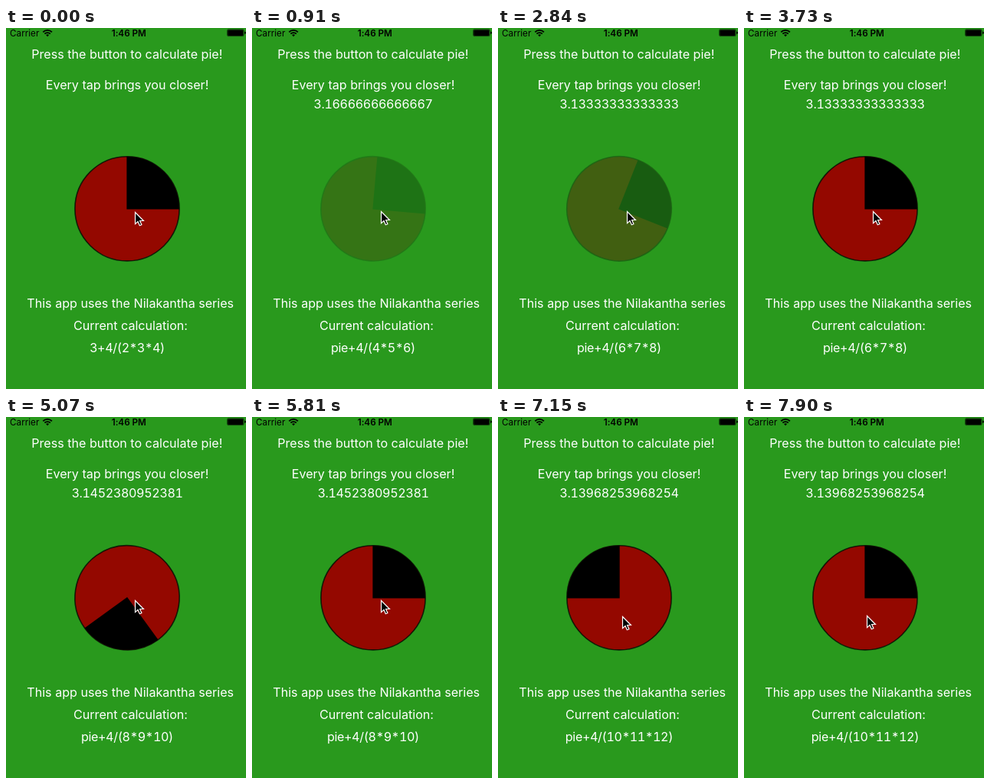
Recreate the animation shown at these times as an HTML page. Size 313 px wide and 471 px high, loop 8000 ms.

```html
<!DOCTYPE html>
<html lang="en">
<head>
<meta charset="utf-8">
<title>Calculate pie</title>
<style>
  html, body { margin: 0; width: 100%; height: 100%; overflow: hidden; background: #29991d; }
  svg { display: block; width: 313px; height: 471px; }
  text { font-family: Inter, Roboto, sans-serif; font-feature-settings: "calt" 0; text-anchor: middle; }
  .label { font-size: 16.1px; fill: #fff; }
  .digits { font-variant-numeric: tabular-nums; letter-spacing: -.35px; }
  .status { font-size: 11.7px; }
</style>
</head>
<body>
<svg viewBox="0 0 313 471">
  <rect width="313" height="471" fill="#29991d"/>

  <g id="status-bar">
    <text class="status" x="24.2" y="10.5">Carrier</text>
    <path d="M48.3 5.3a8.2 8.2 0 0 1 11.6 0M50.4 7.6a5.2 5.2 0 0 1 7.4 0" fill="none" stroke="#000" stroke-width="1.8"/>
    <path d="M54.1 11.2l-2-2.1a2.9 2.9 0 0 1 4 0z"/>
    <text class="status" x="160.3" y="10.5" font-weight="600">1:46 PM</text>
    <rect x="288.5" y="1.8" width="21.6" height="8.8" rx="1.6" fill="none" stroke="#000" stroke-opacity=".6"/>
    <rect x="289.2" y="2.5" width="20.2" height="7.4" rx="1"/>
    <path d="M311.2 4.5q1.6.3 1.6 1.7t-1.6 1.7z"/>
  </g>

  <g class="label">
    <text x="157.8" y="40">Press the button to calculate pie!</text>
    <text x="158" y="80">Every tap brings you closer!</text>
    <text class="digits" id="value" x="158" y="104.7"></text>
    <text x="162.2" y="365">This app uses the Nilakantha series</text>
    <text x="162.5" y="394">Current calculation:</text>
    <text class="digits" id="formula" x="158" y="422.5"></text>
  </g>

  <g id="pie">
    <circle id="crust" r="68"/>
    <path d="M-.6 .7V-68A68 68 0 0 1 68 .7Z"/>
    <circle r="68.1" fill="none" stroke="#000" stroke-opacity=".75" stroke-width="1.6"/>
  </g>

  <path id="cursor" d="M0 0V15.2L3.5 12 5.8 17.3 8.4 16.2 6.1 11H10.9Z" stroke="#fff" stroke-width="1.2"/>
</svg>
<script>
  const LOOP = 8000, SPIN = 1000, FADE_IN = 250, FADE_OUT = 100;

  // Screen refreshes come in evenly spaced runs: [first, last, count].
  const refreshes = [0];
  for (const [first, last, count] of [
    [500, 640, 2], [910, 1950, 8], [2550, 3730, 9],
    [4630, 5810, 9], [6110, 7450, 10], [7750, 7900, 2]
  ]) {
    for (let i = 0; i < count; i++) {
      refreshes.push(Math.round((first + (last - first) * i / (count - 1)) / 10) * 10);
    }
  }

  const taps = [
    { press: 450, release: 896 },
    { press: 2500, release: 2640 },
    { press: 4600, release: 4670 },
    { press: 6180, release: 6400 }
  ];

  // [time, x, y]
  const cursorStops = [
    [0, 168.5, 240.5], [500, 168.5, 239.5], [6110, 165.5, 250],
    [6260, 162.5, 260.5], [7750, 161.5, 260], [7900, 160.5, 259.5]
  ];

  const byId = id => document.getElementById(id);
  const pie = byId('pie'), crust = byId('crust'), cursor = byId('cursor');
  const value = byId('value'), formula = byId('formula');
  const clamp = x => Math.min(1, Math.max(0, x));

  function nilakantha(terms) {
    let sum = 3;
    for (let i = 1; i <= terms; i++) {
      const n = 2 * i;
      sum += (i % 2 ? 4 : -4) / (n * (n + 1) * (n + 2));
    }
    return String(Number(sum.toPrecision(15)));
  }

  function draw(t) {
    const done = taps.filter(tap => t >= tap.release).length;
    const n = 2 * (done + 1);
    value.textContent = done ? nilakantha(done) : '';
    formula.textContent = `${done ? 'pie' : 3}+4/(${n}*${n + 1}*${n + 2})`;

    // A pressed button turns both translucent and darker.
    const tap = taps.findLast(tap => t >= tap.press);
    let strength = 1, angle = 0;
    if (tap && t < tap.release) {
      strength = 1 - clamp((t - tap.press) / FADE_OUT);
    } else if (tap) {
      strength = clamp((t - tap.release) / FADE_IN);
      angle = 360 * clamp((t - tap.release) / SPIN);
    }
    const shade = 0.6 + 0.4 * strength;
    crust.setAttribute('fill', `rgb(${148 * shade}, ${8 * shade}, 0)`);
    pie.setAttribute('opacity', 0.2 + 0.8 * strength);
    pie.setAttribute('transform', `translate(158 235.8) rotate(${angle})`);

    const [, x, y] = cursorStops.findLast(stop => t >= stop[0]);
    cursor.setAttribute('transform', `translate(${x} ${y})`);
  }

  function tick() {
    const now = performance.now() % LOOP;
    draw(refreshes.findLast(time => now >= time));
    requestAnimationFrame(tick);
  }
  tick();
</script>
</body>
</html>
```
